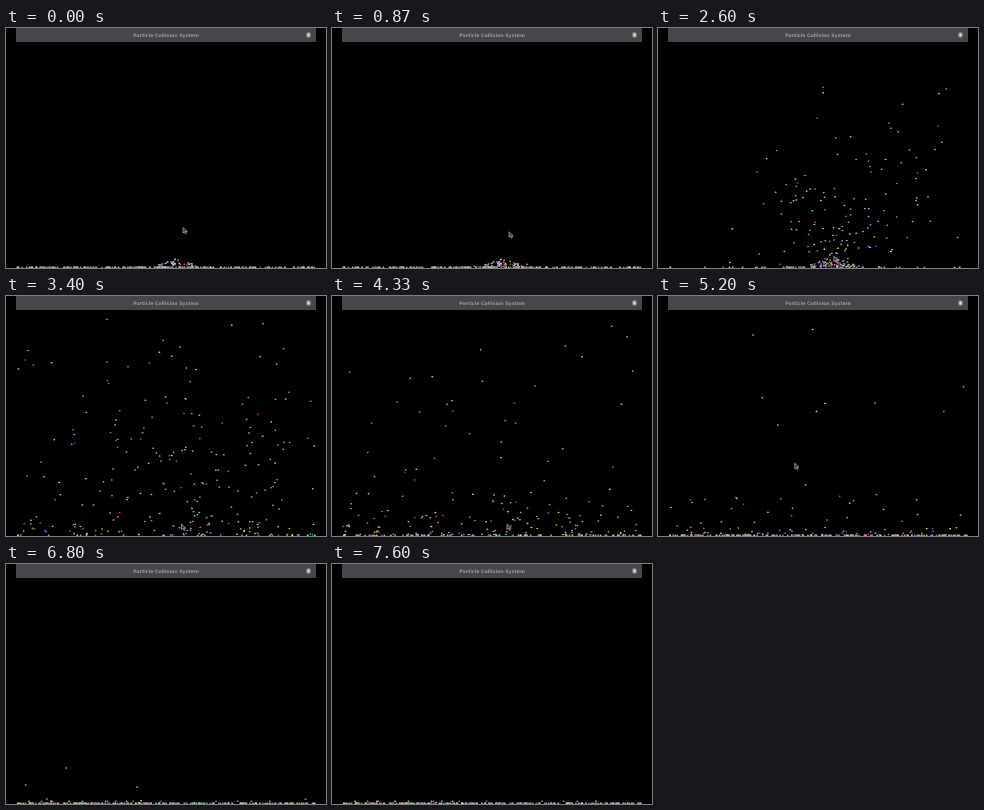
An HTML page with a canvas that plays this animation: 320 px wide and 240 px high, repeating every 7.67 s.

```html
<!DOCTYPE html>
<html lang="en">
<meta charset="utf-8">
<title>Particle Collision System</title>
<style>
html, body { margin: 0; width: 100%; height: 100%; overflow: hidden; background: #000; }
canvas { display: block; }
header {
  position: absolute; left: 10px; top: 0; width: 300px; height: 13.5px;
  background: #46464b; color: #9a98a0;
  font: bold 4.72px/16px "DejaVu Sans", sans-serif; text-align: center;
}
header i {
  position: absolute; left: 290px; top: 4.3px; width: 5.4px; height: 5.4px;
  border-radius: 50%; background: radial-gradient(#ddd 15%, #777 60%);
}
</style>
<canvas width="320" height="240"></canvas>
<header>Particle Collision System<i></i></header>
<script>
const ctx = document.querySelector('canvas').getContext('2d');
const LOOP = 7670, STEP = LOOP / 115;
const LEFT = 11, RIGHT = 309, FLOOR = 239.2, G = 450, BOUNCE = 0.45;
// time in seconds, x, y
const POINTER = [[0, 177, 199.5], [1.73, 177, 208], [2.3, 176, 228], [4.33, 175, 228],
  [4.72, 175, 226], [5.2, 137, 167.5], [6, 28.5, 58], [6.3, -12, 20]];
const ARROW = new Path2D('M0 0V5.5L1.5 4.3 2.5 6.5 3.4 6 2.5 4H4.3Z');

let seed = 41;
const rnd = () => {
  seed = (seed * 16807) % 2147483647;
  return seed / 2147483647;
};
const mix = (a, b, k) => a + (b - a) * k;
const clamp01 = k => Math.max(0, Math.min(1, k));

const particles = Array.from({ length: 270 }, (_, i) => {
  const dx = (rnd() + rnd() - 1) * 24;
  const late = i > 254;
  const launch = late ? 3.5 + 1.1 * rnd() : 2 + 1.3 * rnd() ** 1.2;
  const startsPiled = i < 42;
  return {
    home: mix(LEFT, RIGHT, rnd()),
    pileX: (startsPiled ? 171 : 179) + dx,
    pileY: FLOOR - rnd() * 9 * (1 - Math.abs(dx) / 25),
    arrive: startsPiled ? -1 : i < 75 ? 0.2 + 1.5 * rnd() : launch - 0.1,
    launch,
    vx: (rnd() * 2 - 1) * 210,
    vy: late ? mix(300, 444, rnd()) : mix(130, 444, rnd() ** 1.2),
    rest: rnd() < 0.07 ? 2 : 0,
    color: `hsl(${rnd() * 360} ${mix(25, 80, rnd())}% ${mix(52, 78, rnd())}%)`
  };
});

// Triangle wave between the side walls
function reflect(x) {
  const w = RIGHT - LEFT;
  const m = (((x - LEFT) % (2 * w)) + 2 * w) % (2 * w);
  return LEFT + (m < w ? m : 2 * w - m);
}

function place(p, t) {
  if (t < p.launch) {
    const k = clamp01((t - p.arrive) / 0.7 + 1);
    return [mix(p.home, p.pileX, k), mix(FLOOR, p.pileY, k ** 6)];
  }
  let age = t - p.launch, x = mix(p.pileX, 177, 0.7), vx = p.vx, vy = p.vy;
  while (vy > 12) {
    const flight = 2 * vy / G;
    if (age < flight) {
      return [reflect(x + vx * age), FLOOR - vy * age + G * age * age / 2];
    }
    age -= flight;
    x += vx * flight;
    vx *= 0.75;
    vy *= BOUNCE;
  }
  return [reflect(x), FLOOR - p.rest];
}

function drawPointer(t) {
  const n = POINTER.findIndex(k => k[0] > t);
  if (n < 1) return;
  const [a, b] = [POINTER[n - 1], POINTER[n]];
  const k = (t - a[0]) / (b[0] - a[0]);
  ctx.save();
  ctx.translate(mix(a[1], b[1], k), mix(a[2], b[2], k));
  ctx.fillStyle = '#333';
  ctx.strokeStyle = '#a5a39c';
  ctx.lineWidth = 0.8;
  ctx.fill(ARROW);
  ctx.stroke(ARROW);
  ctx.restore();
}

function frame(now) {
  // Steps fall on 10 ms ticks, so allow for the rounding
  const t = Math.floor((now % LOOP + 5) / STEP) * STEP / 1000;
  ctx.clearRect(0, 0, 320, 240);
  ctx.save();
  ctx.beginPath();
  ctx.rect(10, 0, 300, 240);
  ctx.clip();
  for (const p of particles) {
    const [x, y] = place(p, t);
    ctx.fillStyle = p.color;
    ctx.beginPath();
    ctx.ellipse(x, y, 1, 0.75, 0, 0, 7);
    ctx.fill();
  }
  drawPointer(t);
  ctx.restore();
}

const start = performance.now();
(function tick() {
  frame(performance.now() - start);
  requestAnimationFrame(tick);
})();
</script>
</html>
```
